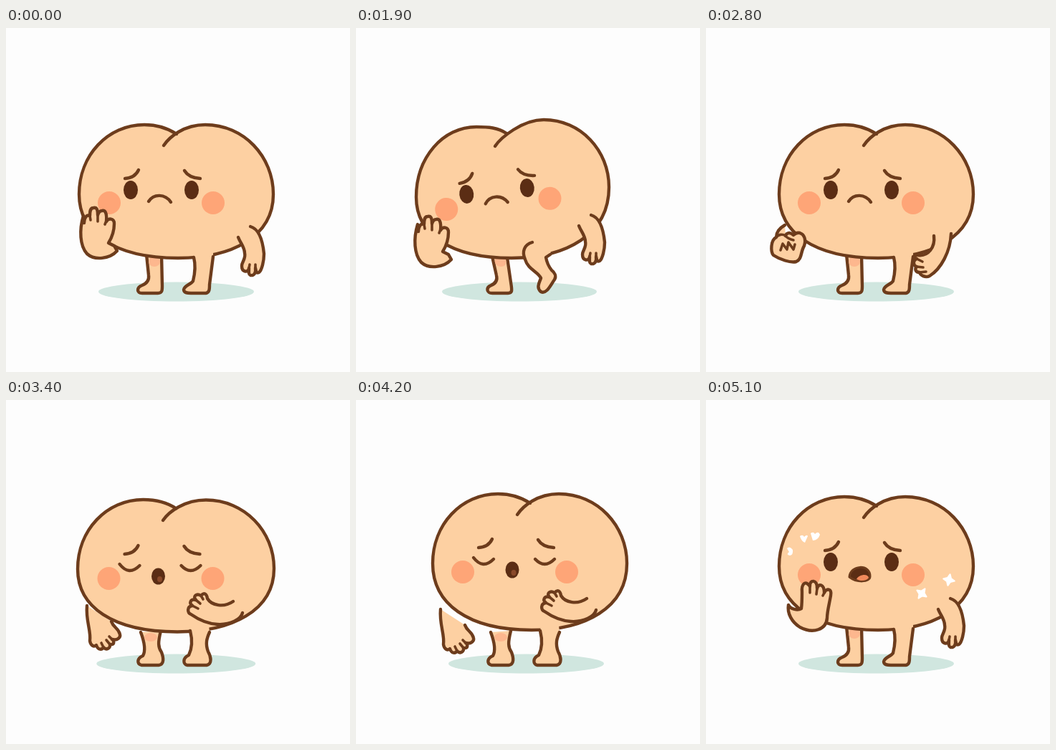
Recreate the animation shown at these times as an HTML page. Size 480x480 px, loop 5.2 s.

```html
<!DOCTYPE html>
<html lang="en">
<head>
<meta charset="utf-8">
<title>Worried round fellow</title>
<style>
html, body { margin: 0; width: 100%; height: 100%; overflow: hidden; background: #fdfdfd; }
svg { display: block; width: 100vw; height: 100vh; }
</style>
</head>
<body>
<svg id="stage" viewBox="0 0 480 480" fill="none" stroke-linecap="round" stroke-linejoin="round"></svg>
<script>
const LOOP = 5200, STEP = 100;
const INK = '#6d3c1c', DARK = '#5b2d14', SKIN = '#fdd0a2', BLUSH = '#fea577', SHADE = '#d0e6df';
const stage = document.getElementById('stage');

const line = (d, w = 4.4) => `<path d="${d}" stroke="${INK}" stroke-width="${w}"/>`;
const blob = (d, fill) => `<path d="${d}" fill="${fill}"/>`;
const oval = (x, y, rx, ry, fill) => `<ellipse cx="${x}" cy="${y}" rx="${rx}" ry="${ry}" fill="${fill}"/>`;
const group = (t, s) => `<g transform="${t}">${s}</g>`;
// A limb is filled past its open end by cap, so it hides the outline it grows from.
const limb = (d, folds = '', cap = '') => blob(d + cap, SKIN) + line(d) + (folds && line(folds, 3.6));

const leftArms = {
  cheek: limb('M108 262C102 282 103 304 113 315C124 325 145 322 155 311L151 304L143 300C148 292 151 284 151 273C151 265 143 265 140 270C141 257 138 254 134 255C130 255 129 258 128 261C128 252 126 250 122 251C117 251 117 257 117 262C112 260 109 266 109 272',
    'M117 262L118 268M128 261L128 270M140 269L138 274'),
  fist: limb('M110 275C103 279 98 285 98 292C90 296 90 312 94 317C103 323 118 328 126 326C134 323 132 312 137 304C140 295 137 288 131 286C127 285 124 287 122 289C117 284 112 286 111 290',
    'M98 292C101 288 107 287 111 290M111 290C114 294 118 295 122 296M104 310L107 301L113 309L115 299L122 309L124 302'),
  hang: limb('M113 287C111 308 119 322 117 336C118 343 123 345 126 342C128 349 134 349 136 345C140 350 146 346 145 341C152 342 151 336 148 334C156 336 160 331 159 327C157 318 150 318 147 309',
    'M136 345L133 339M145 341L140 335M148 334L144 330'),
  hug: group('translate(-13 -6)', limb('M124 277C112 283 112 308 122 319C132 333 155 327 178 315L174 312C180 311 180 305 176 303C181 301 180 295 174 295C178 291 175 286 170 287C174 283 172 279 166 281C155 283 145 294 134 293',
    'M170 287L162 289M174 295L163 295M176 303L165 302')),
  raise: limb('M115 286C113 298 120 310 131 317C150 327 168 320 169 304C169 295 172 285 174 273C176 263 168 262 165 269C165 257 157 255 155 263C156 250 144 250 145 260C138 250 133 258 134 268C134 278 134 284 133 291C128 294 118 292 115 286',
    'M145 260L145 269M155 263L154 271M165 269L163 273')
};

const rightArms = {
  hang: limb('M341 277C352 280 358 295 360 315C360 325 357 338 353 341C349 343 349 339 348 335C349 342 346 346 341 345C338 344 339 339 339 335C338 342 329 341 329 332C329 326 335 322 333 314C333 306 327 300 324 292',
    'M348 335L348 330M339 335L340 330'),
  swing: limb('M342 287C341 312 328 336 312 346C306 349 299 345 298 341C292 341 291 336 294 333C288 331 289 324 294 322C289 319 291 316 296 317C310 319 320 306 318 290',
    'M294 322L302 326M294 333L303 334M298 341L307 340'),
  belly: limb('M317 281C304 290 287 287 281 277C280 270 276 268 272 273C266 269 260 274 265 279C257 277 255 284 260 287C252 288 253 297 258 299C268 306 280 312 295 313C313 314 328 306 330 297',
    'M272 273L275 278M265 279L271 284M260 287L268 291')
};

const thighBlush = oval(207, 326, 8, 7, '#fdb78e');
const leftLegs = {
  straight: limb('M196 316L199 345C200 352 197 356 190 359C182 362 182 370 190 370L212 370C218 370 218 366 218 360L217 316') + thighBlush,
  bent: limb('M188 324C194 340 195 350 191 357C183 360 182 368 189 370L213 370C221 369 220 360 217 352C212 345 212 338 216 322') + oval(202, 331, 9, 6, '#fdb78e')
};
leftLegs.lift = leftLegs.straight;
const rightLegs = {
  straight: limb('M262 320C265 332 263 345 261 353C258 358 249 359 248 365C248 370 254 370 258 370L279 370C284 369 284 364 284 358L289 319', '', 'L289 312L262 312Z'),
  bent: limb('M257 322C261 338 258 350 255 356C246 360 247 369 253 370L280 370C288 368 286 358 282 351C278 340 280 333 284 324', '', 'L283 315L258 315Z'),
  lift: limb('M246 299C235 302 231 312 236 323C240 337 254 340 258 349C256 355 251 362 258 368C266 372 272 358 277 351C280 346 277 341 273 338C269 333 266 326 265 320L271 316', '', 'L274 298Z')
};

const openEyes = oval(174, 226, 10, 13, DARK) + oval(259, 226, 10, 13, DARK);
const faces = {
  sad: openEyes + line('M199 242C206 231 222 231 230 243'),
  sigh: line('M159 224Q172 241 187 226M245 226Q258 240 272 226') + oval(213, 241, 9.5, 11.5, DARK) + oval(215, 245, 3.5, 4, '#8a4a2a'),
  wince: line('M162 231Q174 219 187 230M247 232Q258 220 272 232') +
    `<path d="M196 243C198 230 231 229 233 242C228 246 201 247 196 243Z" fill="${DARK}" stroke="${INK}" stroke-width="3.6"/>` +
    blob('M201 242Q214 235 229 241Q215 245 201 242Z', '#fff4ea'),
  gasp: openEyes + `<path d="M200 247C201 230 229 228 229 246C229 255 210 255 200 247Z" fill="${DARK}" stroke="${INK}" stroke-width="3"/>` +
    blob('M210 250C214 243 226 242 227 248C224 253 215 253 210 250Z', '#f08a5c')
};
const brows = line('M166 210Q180 209 185 198M249 199Q255 209 271 210');
const cheeks = oval(144, 244, 16, 16, BLUSH) + oval(289, 244, 16, 16, BLUSH);

const spark = (x, y, r, turn) => {
  let d = '';
  for (let i = 0; i < 8; i++) {
    const a = turn + i * Math.PI / 4, q = i % 2 ? r * 0.45 : r;
    d += (i ? 'L' : 'M') + (x + q * Math.cos(a)).toFixed(1) + ' ' + (y + q * Math.sin(a)).toFixed(1);
  }
  return `<path d="${d}Z" fill="#fff" stroke="#fff" stroke-width="2"/>`;
};
const sparks = spark(339, 251, 8, 0.2) + spark(301, 270, 8, 0.6) +
  blob('M131 190Q135 187 137 191Q141 187 142 190L138 199Q133 197 131 190Z', '#fff') +
  blob('M146 186Q150 183 152 187Q157 182 159 188Q156 196 149 196Z', '#fff') +
  blob('M113 207Q117 203 121 209Q122 216 117 217Q111 216 116 212Z', '#fff');

// Body: cleft, right top, right, bottom, left, left top, join;
// then face x, y, turn; left arm; right arm; shadow x, radius; leg slant.
const rest = [220,164, 278,135, 373,232, 240,321, 102,232, 193,135, 238,148, 0,0,0, 0,0, 0,0, 237.5,108.5, 0];
const lean = [194,165, 262,128, 353,222, 217,321, 84,236, 168,138, 210,147, -20,1.5,-6, -22,12, -13,-16, 228,108, 7];
const slump = [218,172, 280,144, 375,238, 238,326, 98,240, 190,143, 237,155, -1,10,0, 0,0, 0,0, 237,113.5, 0];
const droop = [236,170, 298,141, 389,238, 250,325, 115,238, 207,140, 256,153, 15,6.5,0, 13,6, 11,10, 243.5,110, 0];

// Shift a pose; the belly line keeps its height, so the body stretches.
const move = (p, dx, dy) => p.map((v, i) => {
  if (i === 7 || i === 16 || i > 20) return v;
  if (i === 18) return v + dx;
  if (i < 14) return v + (i % 2 ? dy : dx);
  if (i === 14 || i === 17 || i === 19) return v + dx;
  return v + dy;
});

const keys = [
  [0, rest], [600, move(rest, 0, 0.6)], [1200, rest], [1300, rest], [1800, lean], [1900, lean],
  [2200, move(lean, -3, -8)], [2400, lean], [2600, move(rest, 16, 0)], [2800, rest], [3200, rest],
  [3600, slump], [3800, slump], [4200, move(rest, 5, -4)], [4600, droop], [4700, droop],
  [4800, move(rest, 0, -12)], [5000, rest], [LOOP, rest]
];

// start, face, left arm, right arm, legs
const acts = [
  [0, 'sad', 'cheek', 'hang', 'straight'],
  [1600, 'sad', 'cheek', 'hang', 'lift'],
  [2400, 'sad', 'cheek', 'hang', 'straight'],
  [2700, 'sad', 'fist', 'swing', 'straight'],
  [3400, 'sigh', 'hang', 'belly', 'bent'],
  [4300, 'wince', 'hug', 'swing', 'bent'],
  [4800, 'gasp', 'raise', 'hang', 'straight']
];

function poseAt(t) {
  let i = 0;
  while (t >= keys[i + 1][0]) i++;
  const [t0, a] = keys[i], [t1, b] = keys[i + 1];
  const k = (t - t0) / (t1 - t0), e = k * k * (3 - 2 * k);
  return a.map((v, n) => v + (b[n] - v) * e);
}

function bodyPath([cx, cy, tx, ty, rx, ry, bx, by, lx, ly, ux, uy, jx, jy]) {
  return `M${cx} ${cy}C${cx + 8} ${cy - 12} ${tx - 30} ${ty} ${tx} ${ty}` +
    `C${tx + 0.57 * (rx - tx)} ${ty} ${rx} ${ry - 0.54 * (ry - ty)} ${rx} ${ry}` +
    `C${rx} ${ry + 0.67 * (by - ry)} ${bx + 0.56 * (rx - bx)} ${by} ${bx} ${by}` +
    `C${bx - 0.65 * (bx - lx)} ${by} ${lx} ${ly + 0.6 * (by - ly)} ${lx} ${ly}` +
    `C${lx} ${ly - 0.56 * (ly - uy)} ${ux - 0.56 * (ux - lx)} ${uy} ${ux} ${uy}` +
    `C${ux + 17} ${uy} ${jx - 12} ${jy - 8} ${jx} ${jy}`;
}

function draw(t) {
  const p = poseAt(t);
  const [, face, left, right, legs] = acts.filter(a => a[0] <= t).pop();
  const [fx, fy, turn, ax, ay, bx, by, sx, sr, slant] = p.slice(14);
  const slide = -370 * Math.tan(slant * Math.PI / 180);
  const leftArm = group(`translate(${ax} ${ay})`, leftArms[left]);
  const behind = left === 'hang';
  stage.innerHTML = oval(sx, 368, sr, 13.5, SHADE) +
    group(`translate(${slide} 0) skewX(${slant})`, leftLegs[legs]) +
    (behind ? leftArm : '') +
    limb(bodyPath(p)) +
    rightLegs[legs] +
    group(`translate(${fx} ${fy}) rotate(${turn} 216.5 226)`, cheeks + brows + faces[face]) +
    (t >= 4900 ? sparks : '') +
    (behind ? '' : leftArm) +
    group(`translate(${bx} ${by})`, rightArms[right]);
}

let shown = -1;
const begin = performance.now();
function tick() {
  const t = Math.floor((performance.now() - begin) % LOOP / STEP) * STEP;
  if (t !== shown) draw(shown = t);
  requestAnimationFrame(tick);
}
tick();
</script>
</body>
</html>
```
